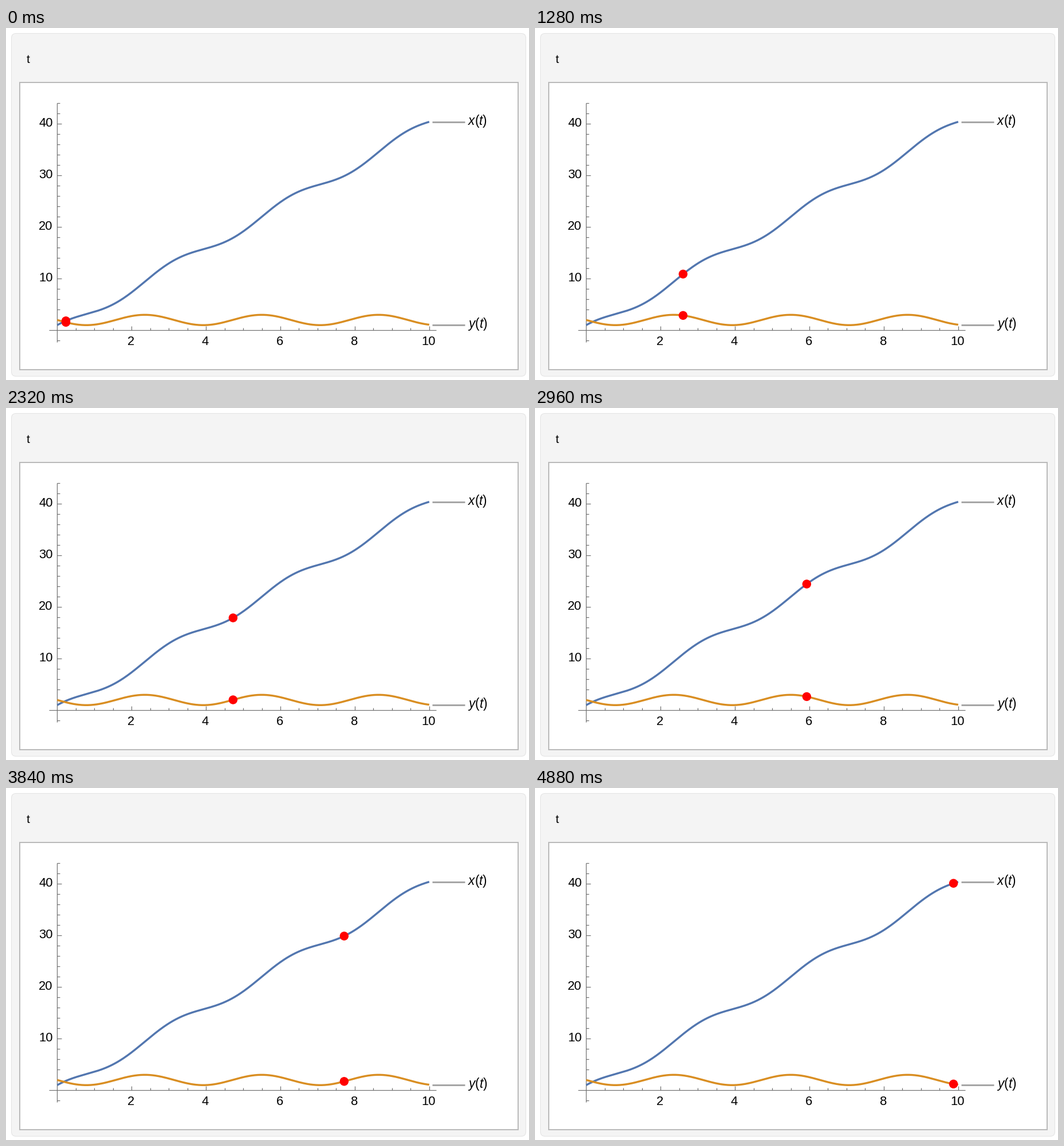
Write a matplotlib script that moves like this. It is 913 by 614 pixels and loops after 4960 ms.

```python
import numpy as np
import matplotlib.pyplot as plt
from matplotlib.animation import FuncAnimation
from matplotlib.patches import Circle, FancyBboxPatch, Rectangle

W, H = 913, 614
DPI = 72  # one point is one pixel
FRAMES, INTERVAL = 62, 80

X0, Y0 = 89.3, 527.3  # pixel position of the plot's zero point
SX, SY = 64.95, 9.0   # pixels per unit

BLUE, ORANGE, RED = "#5276af", "#d98e22", "#ff0000"
AXIS, LEADER = "#707070", "#a6a6a6"

plt.rcParams.update({
    "font.family": "Liberation Sans",
    "mathtext.fontset": "custom",
    "mathtext.rm": "Liberation Sans",
    "mathtext.it": "Liberation Sans:italic",
})


def x_of(t):
    return 4 * t + np.cos(2 * t)


def y_of(t):
    return 2 - np.sin(2 * t)


def px(t):
    return X0 + SX * t


def py(v):
    return Y0 - SY * v


# The slider advances at a slightly uneven pace.
KEY_FRAMES = [0, 10, 16, 29, 37, 48, 61]
KEY_TIMES = [0.235, 1.712, 2.605, 4.728, 5.928, 7.714, 9.873]


def slider(frame):
    return np.interp(frame, KEY_FRAMES, KEY_TIMES)


# A hair of slack keeps the canvas from rounding down by a pixel.
fig = plt.figure(figsize=((W + 0.01) / DPI, (H + 0.01) / DPI), dpi=DPI,
                 facecolor="white")
ax = fig.add_axes([0, 0, 1, 1])
ax.set_xlim(0, W)
ax.set_ylim(H, 0)
ax.axis("off")


def line(xs, ys, color, width, z=3):
    ax.plot(xs, ys, color=color, lw=width, solid_capstyle="butt", zorder=z)


def label(x, y, text, size, ha="center"):
    ax.text(x, y, text, fontsize=size, ha=ha, va="baseline",
            color="black", zorder=4)


def draw_panel():
    ax.add_patch(FancyBboxPatch(
        (9.5, 9.5), 898, 598, boxstyle="round,pad=0,rounding_size=8",
        fc="#f4f4f4", ec="#e3e3e3", lw=1, zorder=0))
    ax.add_patch(Rectangle((24, 95), 870, 501, fc="white", ec="#bababa",
                           lw=2, zorder=1))
    label(35.8, 60.5, "t", 21, "left")


def draw_axes():
    line([75, 751], [Y0, Y0], AXIS, 1.2)
    line([X0, X0], [131, 548.5], AXIS, 1.2)
    for i in range(1, 21):
        length = 4.5 if i % 4 else 7.5
        line([px(i / 2)] * 2, [Y0, Y0 - length], AXIS, 1.2)
    for v in range(-2, 45, 2):
        if v:
            length = 4.5 if v % 10 else 7.5
            line([X0, X0 + length], [py(v)] * 2, AXIS, 1.2)
    for t in range(2, 11, 2):
        label(px(t) - 1.2, 553.3, str(t), 22)
    for v in range(10, 41, 10):
        label(81.8, py(v) + 4.7, str(v), 22, "right")


def draw_curve(func, color, name):
    t = np.linspace(0, 10, 500)
    line(px(t), py(func(t)), color, 3.4, 5)
    end = py(func(10))
    line([743.5, 801], [end, end], LEADER, 3)
    label(805.5, end + 5.5, name, 22.5, "left")


draw_panel()
draw_axes()
draw_curve(x_of, BLUE, "$x(t)$")
draw_curve(y_of, ORANGE, "$y(t)$")

dots = [ax.add_patch(Circle((0, 0), 7.7, fc=RED, ec="none", zorder=6))
        for _ in range(2)]


def update(frame):
    t = slider(frame)
    for dot, func in zip(dots, (x_of, y_of)):
        dot.center = px(t), py(func(t))
    return dots


anim = FuncAnimation(fig, update, frames=FRAMES, interval=INTERVAL,
                     repeat=True, repeat_delay=0, blit=False)
plt.show()
```
